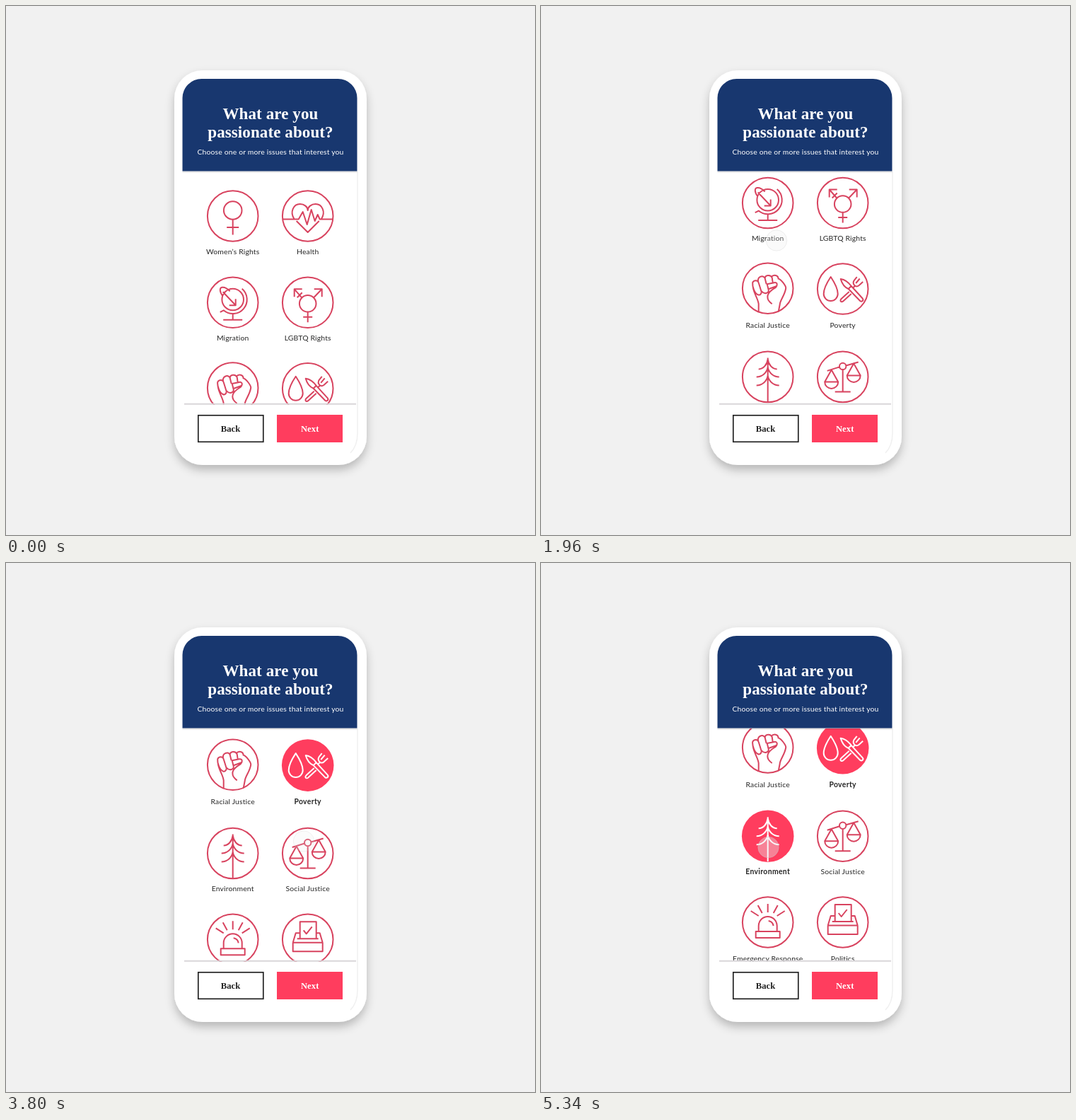
An HTML page for the animation above (5360 ms loop, 748x748 px).

```html
<!DOCTYPE html>
<html lang="en">
<head>
<meta charset="utf-8">
<title>Issue picker</title>
<style>
  html, body { margin: 0; width: 100%; height: 100%; overflow: hidden; background: #f1f1f1; }
  svg { display: block; width: 100%; height: 100%; }
  text { text-anchor: middle; }
  .serif { font: bold 23px "Liberation Serif", serif; letter-spacing: .1px; fill: #fff; }
  .button { font-size: 12.6px; }
  .sans { font: 10.4px Lato, sans-serif; letter-spacing: .16px; fill: #262626; }
  .on .sans { font-weight: bold; letter-spacing: .35px; }
  .icon { fill: none; stroke: #d8435f; stroke-width: 2; stroke-linejoin: round; }
  .on .icon { stroke: #fff; }
  .on .disc { fill: #ff3d5e; stroke: none; }
</style>
</head>
<body>
<svg viewBox="0 0 748 748">
  <defs>
    <clipPath id="view"><rect x="249" y="234" width="248" height="330"/></clipPath>
    <filter id="soft" x="-20%" y="-20%" width="140%" height="140%">
      <feDropShadow dx="0" dy="7" stdDeviation="6.5" flood-opacity=".24"/>
    </filter>
    <linearGradient id="shade" x2="0" y2="1">
      <stop stop-color="#000" stop-opacity=".16"/><stop offset="1" stop-opacity="0"/>
    </linearGradient>
  </defs>
  <rect x="238" y="91" width="272" height="558" rx="40" fill="#fff" filter="url(#soft)"/>
  <path d="M497 234V604Q497 622 487 632" fill="none" stroke="#f0f0f0" stroke-width="1.5"/>
  <g clip-path="url(#view)"><g id="list"></g></g>
  <rect x="249.5" y="233.5" width="247" height="3" fill="url(#shade)"/>
  <path d="M249.5 233.5V130a27 27 0 0 1 27-27h193a27 27 0 0 1 27 27V233.5z" fill="#18376f"/>
  <text class="serif" x="374" y="160">What are you</text>
  <text class="serif" x="374" y="186">passionate about?</text>
  <text class="sans" x="374" y="210" style="fill:#fff">Choose one or more issues that interest you</text>
  <path d="M252 562.8H495" stroke="#d9d6d9" stroke-width="2"/>
  <rect x="271.8" y="578.8" width="92" height="37.5" fill="#fff" stroke="#222" stroke-width="1.7"/>
  <rect x="383" y="578" width="93" height="39" fill="#ff3d5e"/>
  <text class="serif button" x="317.5" y="601.5" style="fill:#222">Back</text>
  <text class="serif button" x="429.7" y="601.5">Next</text>
  <circle id="touch" r="14.7" fill="#ebebeb" fill-opacity=".4" stroke="#c4c4c4" stroke-opacity=".55" stroke-width=".8"/>
</svg>
<script>
const LOOP = 5360;
const $ = id => document.getElementById(id);
const ring = (x, y, r) => `M${x - r} ${y}a${r} ${r} 0 1 0 ${2 * r} 0a${r} ${r} 0 1 0 ${-2 * r} 0`;
const branch = (y, w) =>
  `M${-w} ${y}C${-w / 2} ${y} -1 ${y - 6} 0 ${y - 14}C1 ${y - 6} ${w / 2} ${y} ${w} ${y}`;
const pan = (x, y) =>
  `M${x} ${y}L${x - 9.5} ${y + 17}H${x + 9.5}ZM${x - 9.5} ${y + 17}a9.5 9.5 0 0 0 19 0`;

// Icons are drawn around the centre of their disc.
const icons = {
  women: ring(0, -8, 12.8) + "M0 4.8V26.5M-8.5 16H8.5",
  health: "M-36 4.5H-13L-7 -6L-1 12L5 -9L10 7L14 -2L17 4.5H36" +
    "M-19 4.5C-26 -6 -20 -17 -11 -17C-5 -17 0 -13 0 -8C0 -13 5 -17 11 -17C20 -17 26 -6 19 4.5M-16 7L0 23L16 7",
  globe: ring(0, -4.3, 15.3) + "M13 -19.5A20 20 0 0 1 -13 11L-18 13.5M0 15.7V24.5M-13.5 24.5H13.5" +
    "M-14 -9C-19 -15 -19 -21 -15 -21.5C-11 -22 -7 -19 -4 -16M-14 -15L4 4M-5 4H4V-5",
  pride: ring(0, 1.5, 11.8) + "M0 13.3V28M-6.5 20.5H6.5M-8.5 -7L-19 -19M-19 -8V-19H-8" +
    "M-15 -7L-8 -14M8.5 -7L20 -19M9 -19H20V-8",
  fist: "M-14 9C-19 7 -22 -3 -21.5 -8C-20 -12 -14 -12 -13 -8L-9 5C-9 9 -12 10 -14 9" +
    "M-13 -8C-17 -16 -6 -20 -4 -14L-2 -6M-9 4C-5 9 2 7 1 2L-1 -6L9 -8C14 -9 14 -4 11 -1" +
    "M-4 -14C-4 -19 4 -20 6 -15L7 -8M5 -16C8 -20 15 -19 15 -13" +
    "M14 -14C19 -13 26 -3 25.5 0C24 10 17 17 17 23L15 33M11 -1C2 4 -3 10 1 17Q3 20 6 22" +
    "M-21 -2C-20 7 -14 14 -13 22V34M1 1L12 -3",
  food: "M-17 -17C-23 -8 -27 0 -27 7A10 10 0 0 0 -7 7C-7 0 -11 -8 -17 -17Z" +
    "M-3 -14C4 -13 9 -8 12 -4L8 0C3 -2 -1 -7 -3 -14ZM8 0L24.5 17C27 19 30 16 28 13.5L12 -4" +
    "M9 4L-2 14C-5 17 -2 20 1 17L12 7M15 -2L18 -5" +
    "M20 -17L16 -12C13 -7 18 -1 23 -5L28.5 -10M24 -14.5L18.5 -8",
  tree: "M0 -27V36" + branch(-11, 13) + branch(0, 16) + branch(12, 16),
  scales: ring(0, -15, 4.7) + "M0 -10V21M-11 21H11M-22 -8.5L-4.6 -14M4.6 -16L22 -21" +
    pan(-16, -10) + pan(15.5, -19),
  siren: "M-17 13H17V22H-17ZM-13 13V5A13 13 0 0 1 13 5V13M1 -2Q7 -1 8 5" +
    "M-24 -16L-13 -9M-14 -24L-8 -13M0 -26V-14M14 -24L8 -13M24 -16L13 -9",
  ballot: "M-21 4.5H21V17H-21ZM-11 -9H-17L-21 4.5M12 -9H17L21 4.5M-11 -1V-25H12V-1M-15 -1H15M-6 -13L-2 -8L6 -18"
};

// icon, label, disc centre, label baseline
const items = [
  ["women", "Women’s Rights", 297, 351], ["health", "Health", 297, 351],
  ["globe", "Migration", 419.3, 473], ["pride", "LGBTQ Rights", 419.3, 473],
  ["fist", "Racial Justice", 540, 596], ["food", "Poverty", 540.8, 596],
  ["tree", "Environment", 665.2, 719], ["scales", "Social Justice", 665.2, 719],
  ["siren", "Emergency Response", 787, 842], ["ballot", "Politics", 787, 842]
];

const face = ([icon, label, y, base], x, state) => `<g class="${state}" id="${icon}-${state}">
  <circle class="icon disc" cx="${x}" cy="${y}" r="${state == "on" ? 36.8 : 35.8}"/>
  <path class="icon" d="${icons[icon]}" transform="translate(${x} ${y})"/>
  <text class="sans" x="${x}" y="${base}">${label}</text></g>`;
$("list").innerHTML = items.map((item, i) => {
  const x = i % 2 ? 426.7 : 320.7;
  return face(item, x, "off") + face(item, x, "on");
}).join("");

const ramp = (t, start, length) => Math.min(1, Math.max(0, (t - start) / length));
const bezier = (a, b, p) => 3 * a * p * (1 - p) ** 2 + 3 * b * p * p * (1 - p) + p ** 3;
function ease(u) {
  let lo = 0, hi = 1;
  for (let i = 0; i < 24; i++) {
    const mid = (lo + hi) / 2;
    if (bezier(.25, .25, mid) < u) lo = mid; else hi = mid;
  }
  return bezier(.1, 1, lo);
}

const taps = [
  { icon: "women", x: 333, y: 331.5, show: 620, pick: 980, hide: 1850 },
  { icon: "food", x: 421, y: 393.5, show: 2560, pick: 2920, hide: 3650 },
  { icon: "tree", x: 321.5, y: 402, show: 4500, pick: 4870, hide: LOOP }
];

for (const [icon] of items) $(icon + "-on").setAttribute("opacity", 0);

function draw() {
  const t = performance.now() % LOOP;
  const scroll = 148 * ease(ramp(t, 1613, 480)) + 131 * ease(ramp(t, 3555, 480));
  $("list").setAttribute("transform", `translate(0 ${-scroll})`);
  let touch = 0;
  for (const { icon, x, y, show, pick, hide } of taps) {
    const on = ramp(t, pick, 120);
    $(icon + "-on").setAttribute("opacity", on);
    $(icon + "-off").setAttribute("opacity", 1 - on);
    const alpha = ramp(t, show, 200) - ramp(t, hide, 300);
    if (alpha > 0) {
      touch = alpha;
      $("touch").setAttribute("transform", `translate(${x} ${y})`);
    }
  }
  $("touch").setAttribute("opacity", touch);
  requestAnimationFrame(draw);
}
draw();
</script>
</body>
</html>
```
